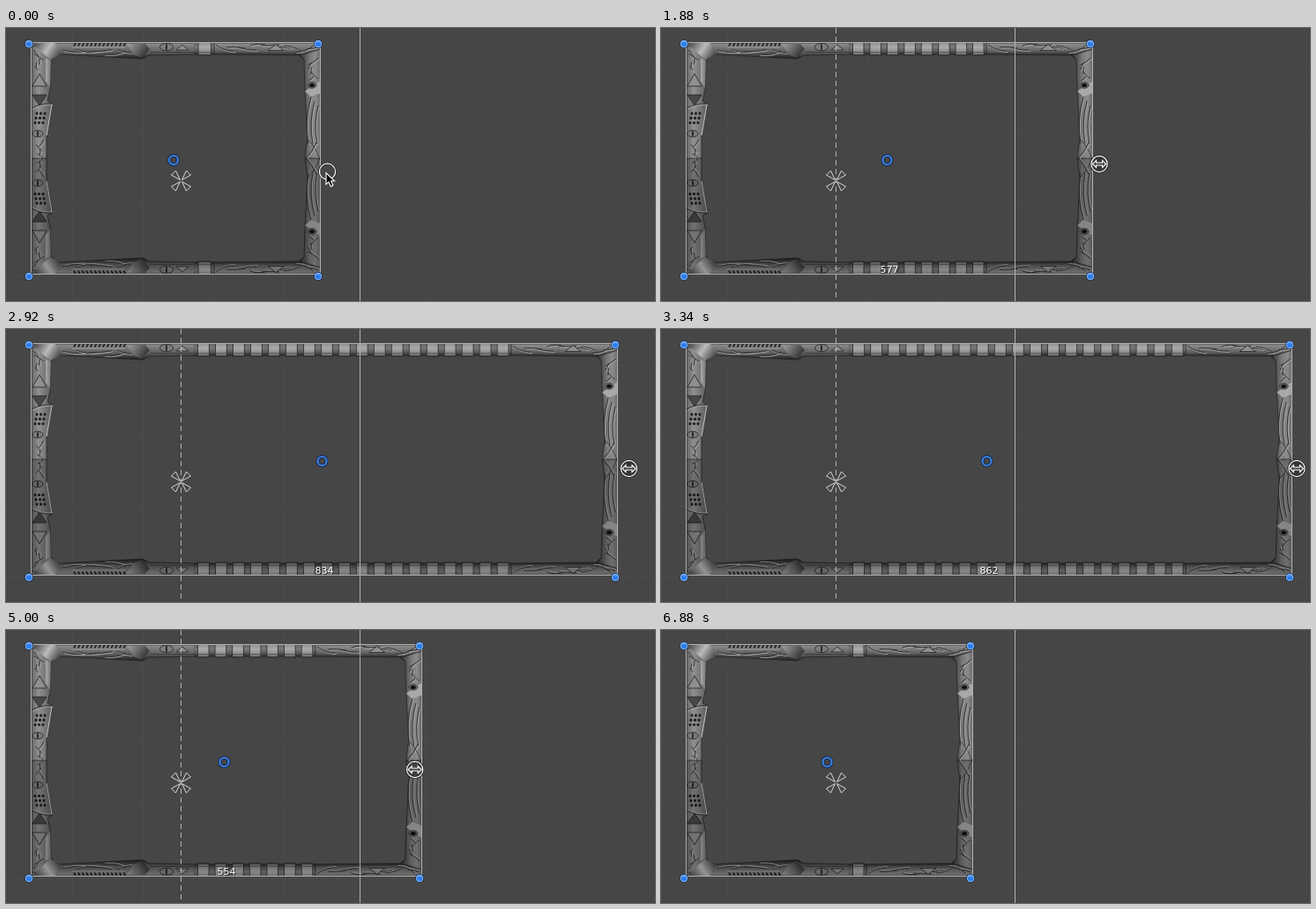
Animation of 736x310 px, one loop 7480 ms. Source, as an HTML page with a canvas:

```html
<!DOCTYPE html>
<html lang="en">
<head>
<meta charset="utf-8">
<title>Resizing a sliced metal frame</title>
<style>
html, body { margin: 0; width: 100%; height: 100%; overflow: hidden; background: #464646; }
canvas { display: block; width: 736px; height: 310px; }
</style>
</head>
<body>
<canvas id="stage" width="736" height="310"></canvas>
<script>
const ctx = document.getElementById('stage').getContext('2d');
const LOOP = 7480, LAST_STEP = 33, GRAB = 6, TURN = 17, RELEASE = 32;
const LEFT = 28.5, TOP = 16.5, BOTTOM = 279.5, MIDDLE = 148;
const REST = 356.5, WIDEST = 715.7, NARROWEST = 353.5;
const CAP_END = 214, CAP_WIDTH = 120, TILE = 20;

let light = 1, seed = 1;
const gray = v => { const c = Math.min(255, Math.round(v * light)); return `rgb(${c},${c},${c})`; };
const clamp01 = v => Math.max(0, Math.min(1, v));

function random() {
  seed = seed * 16807 % 2147483647;
  return seed / 2147483647;
}

// Eased travel; a power below 1 moves the acceleration earlier.
function glide(step, start, end, from, to, power = 1) {
  const u = clamp01((step - start) / (end - start)) ** power;
  return from + (to - from) * u * u * (3 - 2 * u);
}

const edgeAt = step => step < TURN
  ? glide(step, GRAB, 16, REST, WIDEST, .735)
  : Math.max(NARROWEST, glide(step, 18, 28, WIDEST, 351, .95));

function cursorAt(step) {
  if (step === 0) return [364.5, 163];
  if (step === RELEASE) return [362, 163];
  if (step < GRAB) return [glide(step, 2, 4, 364.5, 356.5), glide(step, 2, 4, 160.5, 153.5)];
  const x = step < TURN ? glide(step, GRAB, 15.5, 356, 721, .745) : glide(step, 18, 27.7, 721, 347, .968);
  return [x, glide(step, GRAB, 11, 147, 158.5)];
}

const stepStart = k => 210 * k - 10 * Math.floor((k + 1) / 6);

function stepAt(t) {
  let k = LAST_STEP;
  while (stepStart(k) > t) k--;
  return k;
}

function ramp(x0, y0, x1, y1, ...tones) {
  const g = ctx.createLinearGradient(x0, y0, x1, y1);
  tones.forEach((v, i) => g.addColorStop(i / (tones.length - 1), gray(v)));
  return g;
}

function paint(fill, stroke, width = 1) {
  if (fill) { ctx.fillStyle = fill; ctx.fill(); }
  if (stroke) { ctx.strokeStyle = stroke; ctx.lineWidth = width; ctx.stroke(); }
}

function poly(points, fill, stroke, width) {
  ctx.beginPath();
  points.forEach(([x, y]) => ctx.lineTo(x, y));
  ctx.closePath();
  paint(fill, stroke, width);
}

function line(x0, y0, x1, y1, color, width = 1) {
  ctx.beginPath();
  ctx.moveTo(x0, y0);
  ctx.lineTo(x1, y1);
  paint(null, color, width);
}

function oval(x, y, rx, ry, fill, stroke, width) {
  ctx.beginPath();
  ctx.ellipse(x, y, rx, ry, 0, 0, Math.PI * 2);
  paint(fill, stroke, width);
}

// A carved curve: dark cut with a lit lip beside it.
function groove(x0, y0, x1, y1, bend) {
  const cx = (x0 + x1) / 2 - (y1 - y0) * bend, cy = (y0 + y1) / 2 + (x1 - x0) * bend;
  for (const [shift, tone] of [[1.2, 172], [0, 52]]) {
    ctx.beginPath();
    ctx.moveTo(x0 + shift, y0 + shift);
    ctx.quadraticCurveTo(cx + shift, cy + shift, x1 + shift, y1 + shift);
    paint(null, gray(tone), 1);
  }
}

// Random grooves running lengthwise through a strip.
function carve(x, y, w, h, count) {
  const along = w > h;
  for (let i = 0; i < count; i++) {
    const a = random(), b = random(), c = i / count, d = Math.min(1, c + 1.6 / count);
    const [x0, y0, x1, y1] = along ? [c, a, d, b] : [a, c, b, d];
    groove(x + x0 * w, y + y0 * h, x + x1 * w, y + y1 * h, random() * .4 - .2);
  }
}

function screw(x, y, rx, ry) {
  oval(x, y, rx, ry, gray(130), gray(50));
  line(x, y - ry + 1, x, y + ry - 1, gray(35), 1.8);
}

const wedge = (x, y, w, h) => poly([[x - w, y + h], [x, y - h], [x + w, y + h]], gray(150), gray(55));

function bars(fillBar, fillPost, bar, post) {
  poly(bar, fillBar, gray(40), .8);
  poly(post, fillPost, gray(40), .8);
}

function leftCap() {
  seed = 11;
  bars(ramp(0, 17, 0, 34, 150, 120, 92, 38), ramp(29, 0, 52, 0, 105, 150, 125, 95),
    [[29, 17], [CAP_END, 17], [CAP_END, 30], [162, 31], [155, 35], [62, 30], [29, 40]],
    [[29, 21], [38, 20], [58, 30], [51, 37], [50, 70], [47, 83], [53, 86], [46, 122], [46, MIDDLE], [29, MIDDLE]]);
  poly([[29, 17], [56, 17], [62, 30], [50, 36]], ramp(34, 18, 58, 34, 90, 195, 80));
  poly([[45, 34], [51, 37], [50, 68], [45, 60]], ramp(44, 0, 51, 0, 190, 120));
  carve(31, 25, 14, 23, 5);
  wedge(38, 59, 8, 7);
  poly([[30, 76], [46, 76], [38, 88]], gray(75), gray(45));
  groove(29, 91, 52, 86, -.15);
  for (let i = 0; i < 9; i++)
    oval(35 + i % 3 * 4.5 - Math.floor(i / 3), 97 + Math.floor(i / 3) * 5.3, 1.5, 1.7, gray(30));
  line(52, 87, 46, 122, gray(195), 1.2);
  screw(36, 120, 6, 3.8);
  carve(31, 127, 14, 21, 4);

  carve(64, 24, 78, 6, 5);
  for (let x = 78; x < 135; x += 4.7) line(x + 1, 17, x - 1, 20.5, gray(38), 1.9);
  line(75, 22, 135, 22, gray(165));
  poly([[137, 18], [158, 18], [163, 24], [154, 34], [145, 30]], ramp(138, 18, 160, 34, 165, 105, 40));
  line(163, 27.5, CAP_END, 27.5, gray(65));
  screw(182, 21.5, 7.5, 4.2);
  wedge(200, 22, 7, 3);
}

function clamps(end) {
  const length = end - CAP_END;
  const count = Math.max(1, Math.round(length / TILE));
  const pitch = length / count, width = pitch * .6;
  ctx.fillStyle = ramp(0, 17, 0, 31, 105, 125, 90, 30);
  ctx.fillRect(CAP_END - .5, 17, length + 1, 13.5);
  for (let i = 0; i < count; i++) {
    const x = CAP_END + (i + .5) * pitch - width / 2;
    ctx.fillStyle = gray(45);
    ctx.fillRect(x - .8, 16.5, width + 1.6, 15);
    ctx.fillStyle = ramp(0, 17, 0, 31, 150, 178, 150, 105);
    ctx.fillRect(x, 16.5, width, 13.8);
    line(x, 27.5, x + width, 27.5, gray(95));
  }
}

// Drawn at the resting position; the caller shifts it with the edge.
function rightCap() {
  seed = 29;
  bars(ramp(0, 17, 0, 31, 150, 128, 100, 40), ramp(338, 0, 357, 0, 80, 125, 145, 110),
    [[236, 17], [REST, 17], [REST, 36], [338, 36], [332, 31], [236, 30]],
    [[334, 31], [REST, 24], [REST, MIDDLE], [339, MIDDLE], [342, 125], [339, 70], [338, 36]]);
  carve(238, 19, 116, 9, 9);
  wedge(306, 22, 9, 3.5);
  carve(341, 34, 14, 26, 5);
  poly([[339, 72], [REST, 60], [REST, 74], [346, 78]], gray(175));
  oval(347, 65, 5, 3.3, gray(115), gray(60));
  oval(347, 65, 3, 2, gray(15));
  for (let i = 0; i < 3; i++) groove(346 + i * 4, 78 + i * 5, 343 + i * 5, 132, .12);
  groove(341, 125, 356, MIDDLE, -.12);
  groove(340, MIDDLE, 352, 130, .1);
}

function halfFrame(edge, brightness) {
  light = brightness;
  ctx.save();
  ctx.beginPath();
  ctx.rect(28, 16, edge - 28, MIDDLE - 16);
  ctx.clip();
  leftCap();
  clamps(edge - CAP_WIDTH);
  ctx.translate(edge - REST, 0);
  rightCap();
  ctx.restore();
}

function metalFrame(edge) {
  halfFrame(edge, .96);
  ctx.save();
  ctx.translate(0, 2 * MIDDLE);
  ctx.scale(1, -1);
  halfFrame(edge, .76);
  ctx.restore();
}

function background() {
  ctx.fillStyle = '#464646';
  ctx.fillRect(0, 0, 736, 310);
  for (let x = 75.5; x < 736; x += 80) line(x, 0, x, 310, '#4a4a4a');
  for (let y = 41.5; y < 310; y += 80) line(0, y, 736, y, '#4a4a4a');
}

function handle(x, y) {
  const g = ctx.createLinearGradient(0, y - 4, 0, y + 4);
  g.addColorStop(0, '#69acff');
  g.addColorStop(.5, '#2877e8');
  g.addColorStop(1, '#2d8cff');
  oval(x, y, 4.9, 4.9, '#152d55');
  oval(x, y, 3.8, 3.8, g, '#a9cdf8', .8);
}

function centreRing(x) {
  oval(x, 150, 5, 5, null, '#152b51', 4);
  oval(x, 150, 5, 5, null, '#3d80de', 2.2);
}

function pivot() {
  ctx.save();
  ctx.translate(198.5, 173.5);
  for (const sx of [-1, 1])
    for (const sy of [-1, 1])
      poly([[sx, sy], [sx * 11, sy * 6.5], [sx * 6, sy * 11.5]], null, '#e8e8e8', .9);
  ctx.restore();
}

function dragGuide(edge) {
  ctx.setLineDash([6, 4]);
  line(198.5, 0, 198.5, 310, '#b4b4b4');
  ctx.setLineDash([]);
  const size = Math.floor(555.3 + (edge - 472) * 1.259);
  const x = Math.round((LEFT + edge) / 2);
  ctx.font = '11px "DejaVu Sans", sans-serif';
  ctx.textAlign = 'center';
  ctx.fillStyle = '#222';
  ctx.fillText(size, x + 1, 279);
  ctx.fillStyle = '#fff';
  ctx.fillText(size, x, 278);
}

function pointer(x, y) {
  const shape = [[0, 0], [0, 13], [3, 10.3], [5.3, 15.5], [8, 14.3], [5.6, 9.3], [9.6, 9.3]];
  poly(shape.map(([dx, dy]) => [x + dx, y + dy]), '#000', '#fff', 1.1);
}

function doubleArrow(x, y) {
  const quarter = [[7.5, 0], [3.5, 4], [3.5, 1.5]];
  const right = [...quarter.slice(1).reverse().map(([dx, dy]) => [dx, -dy]), ...quarter];
  const outline = [...right, ...right.map(([dx, dy]) => [-dx, -dy])];
  poly(outline.map(([dx, dy]) => [x + dx, y + dy]), '#444', '#fff', 1.1);
}

function cursor(x, y, idle) {
  oval(x, y, 9.3, 9.3, idle ? null : 'rgba(45,45,45,.65)', '#252525', 2.4);
  oval(x, y, 9.1, 9.1, null, '#fff', 1.2);
  if (idle) pointer(x - 1.5, y + 1.5);
  else doubleArrow(x, y);
}

function draw(step) {
  const edge = edgeAt(step), handleX = Math.floor(edge - 2);
  background();
  metalFrame(edge);
  ctx.strokeStyle = '#b1b1b1';
  ctx.lineWidth = 1;
  ctx.strokeRect(LEFT, TOP, Math.floor(edge) + .5 - LEFT, BOTTOM - TOP);
  line(401.5, 0, 401.5, 310, '#b0b0b0');
  if (step > GRAB && step < RELEASE) dragGuide(edge);
  pivot();
  centreRing((26 + handleX) / 2);
  for (const x of [26, handleX])
    for (const y of [18, 282]) handle(x, y);
  if (step < LAST_STEP) cursor(...cursorAt(step), step === 0 || step === RELEASE);
}

let began;
function tick(now) {
  began ??= now;
  draw(stepAt((now - began) % LOOP));
  requestAnimationFrame(tick);
}
draw(0);
requestAnimationFrame(tick);
</script>
</body>
</html>
```
